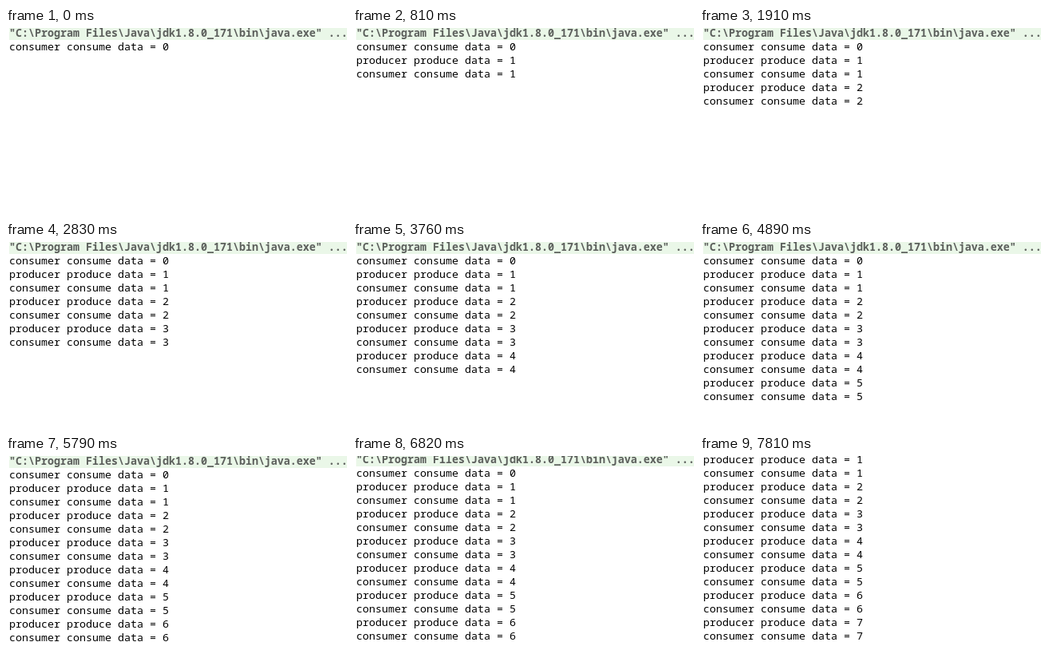
These frames come from a looping animation (427 px wide and 233 px high, 8 s). An HTML page:

```html
<!DOCTYPE html>
<html lang="en">
<head>
<meta charset="utf-8">
<title>Producer and consumer console</title>
<style>
  html, body { margin: 0; width: 100%; height: 100%; overflow: hidden; background: #fff; }
  svg { display: block; width: 427px; height: 233px; }
  text { font: 13.333px "Noto Sans Mono", "DejaVu Sans Mono", monospace; fill: #000; }
  .command { font-weight: 700; fill: #5c5f5c; }
  .fold { fill: #eaf7e8; }
</style>
</head>
<body>
<svg viewBox="0 0 427 233">
  <g id="log">
    <rect class="fold" x="4" y="-2" width="423" height="17"/>
    <text class="command" x="4" y="11">"C:\Program Files\Java\jdk1.8.0_171\bin\java.exe" ...</text>
  </g>
</svg>
<script>
  const LOOP = 8000, LINE = 17, BASELINE = 11, LEFT = 4;

  // Time in ms, highest number printed, scroll offset in px
  const steps = [
    [0, 0, 0], [810, 1, 0], [1910, 2, 0], [2830, 3, 0], [3760, 4, 0],
    [4890, 5, 0], [5790, 6, 0], [6820, 6, 2], [7810, 7, 36]
  ];

  const log = document.getElementById("log");
  const rows = [];

  function addRow(message, value) {
    const row = document.createElementNS(log.namespaceURI, "text");
    row.setAttribute("x", LEFT);
    row.setAttribute("y", BASELINE + LINE * (rows.length + 1));
    row.textContent = `${message} data = ${value}`;
    log.append(row);
    rows.push({ row, value });
  }

  for (let value = 0; value <= 7; value++) {
    if (value > 0) addRow("producer produce", value);
    addRow("consumer consume", value);
  }

  function draw(time) {
    const [, last, scroll] = steps.findLast(([start]) => start <= time);
    log.setAttribute("transform", `translate(0 ${-scroll})`);
    for (const { row, value } of rows) {
      row.setAttribute("visibility", value <= last ? "visible" : "hidden");
    }
  }

  const begin = performance.now();
  function tick() {
    draw((performance.now() - begin) % LOOP);
    requestAnimationFrame(tick);
  }
  tick();
</script>
</body>
</html>
```
